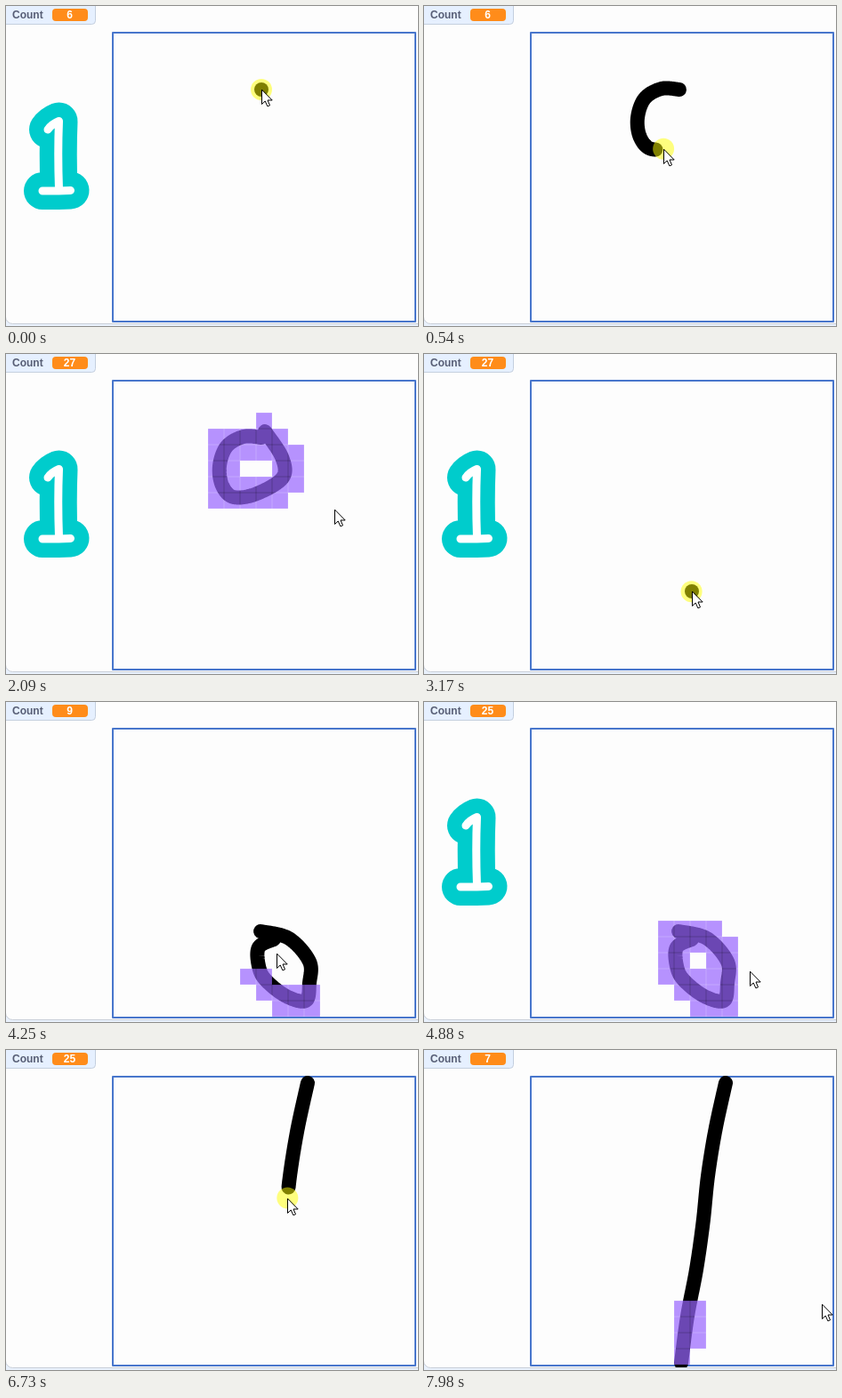
An HTML page with a canvas for the animation above (8 s loop, 463 px wide and 360 px high).

```html
<!DOCTYPE html>
<html lang="en">
<head>
<meta charset="utf-8">
<title>Digit drawing</title>
<style>
  html, body { margin: 0; width: 463px; height: 360px; overflow: hidden; background: #fff; }
  canvas { display: block; }
</style>
</head>
<body>
<canvas id="stage" width="463" height="360"></canvas>
<script>
const ctx = document.getElementById('stage').getContext('2d');
const LOOP = 8000, STEP = 77.4, PEN_LAG = 33, PEN_WIDTH = 16;
const CELL = 18, GRID_X = 119, GRID_Y = 30, GRID_SIZE = 18;
const CELL_TIME = 35, REACH = 7.5, FIRST_COUNT = 6;

const clamp = (v, lo, hi) => Math.max(lo, Math.min(hi, v));

// Catmull-Rom curve through the points, p from 0 to 1
function curve(pts, p) {
  const last = pts.length - 1;
  const i = Math.min(Math.floor(p * last), last - 1);
  const u = p * last - i;
  const [a, b, c, d] = [i - 1, i, i + 1, i + 2].map(k => pts[clamp(k, 0, last)]);
  return [0, 1].map(k => b[k] + u / 2 * (c[k] - a[k]
    + u * (2 * a[k] - 5 * b[k] + 4 * c[k] - d[k]
    + u * (3 * (b[k] - c[k]) + d[k] - a[k]))));
}

const trace = (pts, to, n = 160) =>
  Array.from({ length: n + 1 }, (_, i) => curve(pts, to * i / n));

// Pen strokes: the button is down from start to end, then the grid is scanned
const strokes = [
  { start: 0, end: 880, ease: 1, scan: 804, pts: [
    [287, 94], [267, 93], [248, 104], [240, 126], [243, 148],
    [256, 161], [282, 157], [311, 139], [310, 116], [291, 87]] },
  { start: 3170, end: 3890, ease: 1, scan: 3928, pts: [
    [301, 267], [284, 276], [284, 297], [292, 313], [315, 331],
    [337, 336], [341, 316], [341, 292], [318, 266], [286, 258]] },
  { start: 6420, end: 7680, ease: 1.85, scan: 7716, pts: [
    [339, 37], [327.5, 89.5], [319, 142], [313.5, 194.5], [306, 247], [296, 299.5], [289, 352]] }
];

// Free mouse moves; each begins where the leg before it ended
const glide = (start, end, ...pts) => ({ start, end, ease: 1, pts });
const legs = [
  strokes[0],
  glide(885, 1700, [337, 126], [362, 160], [372, 180]),
  glide(2060, 2480, [346, 127], [360, 140]),
  glide(2670, 3170, [354, 235], [330, 288], [301, 267]),
  strokes[1],
  glide(3935, 4876, [303, 282], [345, 296], [366, 303]),
  glide(5220, 5960, [385, 254], [376, 160], [336, 68]),
  glide(6090, 6420, [339, 37]),
  strokes[2],
  glide(7690, 7972, [447, 286])
];
legs.forEach((leg, i) => {
  if (!strokes.includes(leg)) leg.pts.unshift(legs[i - 1].pts.at(-1));
});

// Grid cells the pen touches, row by row from the bottom
function touchedCells(pts) {
  const path = trace(pts, 1, 400), cells = [];
  for (let row = GRID_SIZE - 1; row >= 0; row--) {
    for (let col = 0; col < GRID_SIZE; col++) {
      const x = GRID_X + col * CELL, y = GRID_Y + row * CELL;
      const hit = path.some(([px, py]) =>
        Math.hypot(px - clamp(px, x, x + CELL), py - clamp(py, y, y + CELL)) < REACH);
      if (hit) cells.push([x, y]);
    }
  }
  return cells;
}
strokes.forEach((s, i) => {
  s.cells = touchedCells(s.pts);
  s.before = i ? strokes[i - 1].cells.length : FIRST_COUNT;
});

const progress = (leg, t) =>
  1 - (1 - clamp((t - leg.start) / (leg.end - leg.start), 0, 1)) ** leg.ease;

const latest = (list, t) => list.filter(k => k.start <= t).pop();

function box(x, y, w, h, radius, fill, line) {
  ctx.beginPath();
  ctx.roundRect(x, y, w, h, radius);
  ctx.fillStyle = fill;
  ctx.fill();
  if (line) {
    ctx.strokeStyle = line;
    ctx.lineWidth = 1;
    ctx.stroke();
  }
}

function drawBackdrop() {
  ctx.fillStyle = '#e9f1fc';
  ctx.fillRect(0, 0, 463, 360);
  box(-0.5, -20.5, 500, 378, 8, '#fdfdfd', '#c8ced8');
  ctx.strokeStyle = '#4876cc';
  ctx.lineWidth = 2;
  ctx.strokeRect(120, 30, 340, 325);
}

function drawCounter(n) {
  box(-5.5, -5.5, 106, 26, 4, '#e6f0ff', '#c4cfde');
  box(52, 3, 40, 14, 4, '#ff8c1a');
  ctx.font = 'bold 12px "Liberation Sans", Arial, sans-serif';
  ctx.textAlign = 'left';
  ctx.fillStyle = '#575e75';
  ctx.fillText('Count', 7, 14);
  ctx.textAlign = 'center';
  ctx.fillStyle = '#fff';
  ctx.fillText(n, 71.5, 14);
}

const digit = new Path2D('M47 139Q51 133 59.5 129.5Q58 165 59.5 206M41 208H59L72.5 207.5');

function drawDigit() {
  for (const [width, color] of [[42, '#00cccc'], [9, '#fff']]) {
    ctx.lineWidth = width;
    ctx.strokeStyle = color;
    ctx.stroke(digit);
  }
}

function drawPen(stroke, t) {
  ctx.beginPath();
  for (const [x, y] of trace(stroke.pts, progress(stroke, t - PEN_LAG))) ctx.lineTo(x, y);
  ctx.strokeStyle = '#000';
  ctx.lineWidth = PEN_WIDTH;
  ctx.stroke();
}

function drawCells(cells) {
  ctx.fillStyle = 'rgba(153,102,255,.7)';
  for (const [x, y] of cells) ctx.fillRect(x + 0.1, y + 0.1, CELL - 0.2, CELL - 0.2);
}

const arrow = new Path2D('M0 0V16L3.7 12.5L6.4 18.4L9 17.3L6.5 11.5H11.3Z');

function drawMouse([x, y], down) {
  if (down) {
    ctx.beginPath();
    ctx.arc(x, y, 12, 0, Math.PI * 2);
    ctx.fillStyle = 'rgba(255,255,0,.5)';
    ctx.fill();
  }
  ctx.save();
  ctx.translate(Math.round(x) + 0.5, Math.round(y) + 0.5);
  ctx.lineJoin = 'miter';
  ctx.lineWidth = 1;
  ctx.fillStyle = '#fff';
  ctx.strokeStyle = '#000';
  ctx.fill(arrow);
  ctx.stroke(arrow);
  ctx.restore();
}

function render(now) {
  const t = Math.floor(now / STEP + 0.2) * STEP;
  const stroke = latest(strokes, t), leg = latest(legs, t);
  const down = t < stroke.end;
  const ticks = Math.floor((t - stroke.scan) / CELL_TIME);
  const count = down ? 0 : clamp(ticks, 0, stroke.cells.length);
  const solved = !down && ticks >= stroke.cells.length;

  ctx.lineCap = ctx.lineJoin = 'round';
  drawBackdrop();
  if (solved || t < stroke.start + STEP / 2) drawDigit();

  ctx.save();
  ctx.beginPath();
  ctx.rect(0, 0, 463, 357);
  ctx.clip();
  drawPen(stroke, t);
  drawCells(stroke.cells.slice(0, count));
  ctx.restore();

  drawCounter(down ? stroke.before : count);
  drawMouse(curve(leg.pts, progress(leg, t)), down);
}

const start = performance.now();
function frame() {
  render((performance.now() - start) % LOOP);
  requestAnimationFrame(frame);
}
frame();
</script>
</body>
</html>
```
